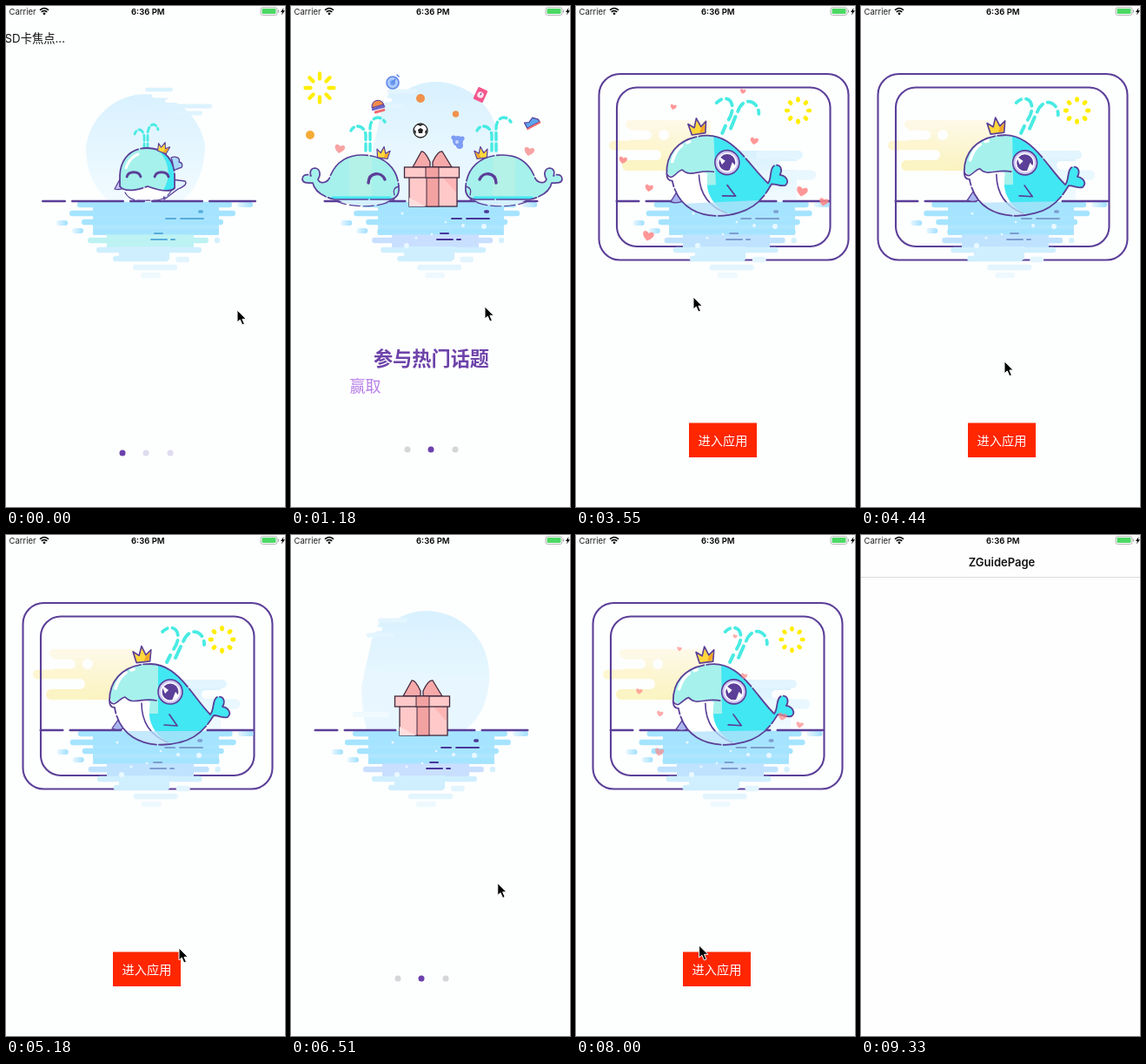
Recreate the animation shown at these times as an HTML page. Size 321x575 px, loop 9670 ms.

```html
<!DOCTYPE html>
<html lang="zh">
<head>
<meta charset="utf-8">
<title>Guide pages</title>
<style>
html,body{margin:0;width:100%;height:100%;overflow:hidden;background:#fdfefe}
svg{display:block;width:100vw;height:100vh}
.ui{font-family:Inter,Roboto,sans-serif}
.cjk{font-family:"Noto Sans CJK SC","Noto Sans CJK",sans-serif}
.ln{fill:none;stroke-linecap:round;stroke-linejoin:round}
</style>
</head>
<body>
<svg id="stage" viewBox="0 0 321 575" preserveAspectRatio="none"></svg>
<script>
const INK = '#5b3f98', AQUA = '#a6f1ec', CYAN = '#41e7f2', TEAL = '#48ebe3';
const STEP = 148.1, LOOP = 9670, LAST = 63, SUBTITLE = '赢取海量精美好礼奖品';

// Shape helpers
const line = (d, c, w, more = '') => `<path class="ln" d="${d}" stroke="${c}" stroke-width="${w}" ${more}/>`;
const fill = (d, c, w = 0, s = INK) => `<path d="${d}" fill="${c}" stroke="${w ? s : 'none'}" stroke-width="${w}" stroke-linejoin="round"/>`;
const pill = (a, b, y, h, c) => line(`M${a + h / 2} ${y}H${b - h / 2}`, c, h);
const dot = (x, y, r, c, more = '') => `<circle cx="${x}" cy="${y}" r="${r}" fill="${c}" ${more}/>`;
const rect = (x, y, w, h, c, more = '') => `<rect x="${x}" y="${y}" width="${w}" height="${h}" fill="${c}" ${more}/>`;
const group = (id, body, more = '') => `<g id="${id}" ${more}>${body}</g>`;
const at = (x, y, body, more = '') => `<g transform="translate(${x} ${y}) ${more}">${body}</g>`;

const heart = (s, c) => `<path transform="rotate(12) scale(${s})" d="M0 5C-10 -1 -5 -8 0 -3C5 -8 10 -1 0 5Z" fill="${c}"/>`;
const crown = (x, y, s, r) => at(x, y, fill('M-6 6L-8 -4L-3 0L0 -8L3 0L8 -4L6 6Z', '#ffd83c', 1.3) +
  fill('M1 5L3 1L7 -2L5 5Z', '#f5a524'), `rotate(${r}) scale(${s})`);
const sun = (a, b, w) => Array.from({length: 8}, (_, i) =>
  line(`M${a} 0H${b}`, '#ffee00', w, `transform="rotate(${i * 45})"`)).join('');
const dots = (on, y, c) => [134, 161, 189].map((x, i) => dot(x, y, 3.5, i === on ? '#6c41ac' : c)).join('');

function water(mark, tint, shift) {
  const b = '#a5e4ff', soft = '#cfeffe', pale = '#e3f5fe';
  const rows = [[82, 260, 228, b], [73, 264, 238, b], [87, 250, 248, b], [100, 245, 259, b], [94, 233, 269, tint],
    [104, 225, 280, soft], [123, 187, 290, soft], [195, 211, 291, pale], [146, 197, 300, pale], [155, 178, 309, '#eef9fe']];
  const marks = [[221, 227, 236], [183, 196, 244], [200, 228, 244], [170, 181, 261], [166, 186, 268], [189, 195, 268]];
  const bits = [[266, 284, 228], [58, 71, 249], [76, 89, 258]];
  const cuts = [[38, 6, 20], [69, 4, 0]];
  return rect(100, 225, 145, 38, 'url(#deep)') + rect(116, 262, 100, 15, tint) + rect(130, 276, 58, 15, soft) +
    `<g class="sway">` + rows.map(r => pill(r[0], r[1], r[2], 6.6, r[3])).join('') +
    bits.map(r => rect(r[0], r[2] - 3, r[1] - r[0], 6, 'url(#bit)', 'rx="3"')).join('') +
    dot(243, 269, 3.2, '#d4f0fd') + `</g><g class="sway2">` +
    marks.map(r => pill(...r, r[2] === 236 ? 3.4 : 2.2, mark)).join('') + `</g>` +
    [[41, 69], [75, 136], [142, 160], [167, 227], [233, 288]].map(s => pill(s[0] + shift, s[1] + shift, 224, 2.6, INK)).join('');
}
const bubbles = [[222, 253, 3], [198, 252, 2], [133, 275, 3], [128, 238, 1.5], [144, 266, 1.5], [162, 262, 1.3], [178, 248, 1.3]]
  .map(b => dot(...b, '#e9f8ff')).join('');

// First page
const whale1 =
  line('M159 164V150C158 141 151 139 148 147M163 164V146C164 134 173 133 175 142', TEAL, 2.8, 'stroke-dasharray="6 3.5"') +
  fill('M192 190C193 180 191 178 190 174C195 172 201 174 199 179C204 180 204 186 199 186C197 188 194 187 192 190Z', '#a9d9fa', 1.3) +
  fill('M132 197L125 210Q130 212 137 208Z', '#c8c8f5', 1.3) +
  fill('M190 199L206 201Q210 205 198 210L182 222L180 208Z', '#dff3ff', 1.3) +
  fill('M134 207C138 226 184 228 192 208Z', '#fff') +
  line('M137 214C142 224 154 224 162 223C176 224 184 222 190 212', INK, 1.2, 'stroke-dasharray="14 4"') +
  fill('M131 207V194C132 174 145 163 162 163C181 163 193 175 194 194V209C188 215 174 211 163 207C151 211 137 215 131 207Z', AQUA) +
  fill('M176 167C188 172 193 182 193 194V209Q189 213 181 211C190 198 188 178 176 167Z', CYAN) +
  line('M138 186Q142 174 152 170', '#fff', 3) +
  line('M131 207V194C132 174 145 163 162 163C181 163 193 175 194 194V209C188 215 174 211 163 207C151 211 137 215 131 207Z', INK, 1.8, 'stroke-dasharray="52 3"') +
  line('M139 196C141 189 153 189 155 196M171 196C173 189 185 189 187 196', INK, 2.8) + crown(181, 163, .85, 18);
const page1 =
  `<path d="M92 224V162A69 69 0 0 1 229 162Q227 205 202 224H119Q92 203 92 162Z" fill="url(#sky)"/>` +
  pill(160, 192, 96, 4.5, '#d9f2fe') + pill(168, 204, 103, 5, '#fdfefe') + pill(175, 237, 115, 5, '#dcf3fe') +
  pill(183, 234, 109, 4, '#fdfefe') + pill(190, 226, 123, 5, '#def4fe') +
  water('#58addb', '#bdf2f3', 0) + group('whale1', whale1) + dots(0, 513, '#dfdcf0');

// Second page
const whaleBody = 'M82 171C60 171 49 184 44 198C40 204 33 204 31 199C35 193 33 187 28 186C23 186 21 190 23 195C18 192 13 194 13 199C14 204 20 203 25 203C27 212 36 219 50 222H112C120 222 125 217 124 208C123 185 106 171 82 171Z';
const whale2 = fill('M50 220C68 233 104 233 121 218Z', '#d5f0fc') + fill(whaleBody, AQUA) +
  fill('M67 175Q80 170 93 173V220H67Z', '#b4f1e6') + line('M48 220H114', CYAN, 3) +
  line('M52 224C70 232 102 232 119 222', INK, 1.2, 'stroke-dasharray="12 4"') +
  line(whaleBody, INK, 1.7, 'stroke-dasharray="46 3"') + line('M124 207Q116 209 119 217', INK, 1.3) +
  line('M89 203C90 190 104 190 108 199', INK, 3.4) + crown(106, 169, .95, 8);
const spray2 = line('M86 166V148C85 138 74 134 69 143M91 166V140C91 128 102 124 108 133', TEAL, 3.4, 'stroke-dasharray="8 4.5"');
const EDGE = '#40283d';
const bow = fill('M160 185H140L150 167Q154 166 160 179Z', '#f6a9a9', 1.3, EDGE) + fill('M163 185H185L174 167Q169 166 163 179Z', '#f6a9a9', 1.3, EDGE);
const gift = rect(136, 196, 55, 34, '#ffc9c9', `stroke="${EDGE}" stroke-width="1.3"`) + rect(156, 196, 14, 34, '#f3a2a2', `stroke="${EDGE}"`) +
  fill('M136 220V230H155Z', '#ffdede') + fill('M175 197H190V214Z', '#ffb5b5') +
  group('lid', bow + rect(130.5, 185, 63, 12, '#ffc9c9', `stroke="${EDGE}" stroke-width="1.3"`) + rect(155, 185, 15, 12, '#f3a2a2', `stroke="${EDGE}"`));
const icons = [
  [117, 87, dot(0, 1, 7, '#a9c9ff', 'stroke="#5f86e8" stroke-width="1.6"') + dot(0, 1, 3, '#6d9cf0') + line('M5 -8L7 -6M0 1L3 -3', '#5f86e8', 1.6)],
  [149, 106, dot(0, 0, 5, '#f0914c')],
  [189.5, 124, dot(0, 0, 3.7, '#f0914c')],
  [22, 148, dot(0, 0, 5, '#f5ab38')],
  [100, 115, at(0, 0, fill('M-7 0C-6 -9 6 -9 7 0Z', '#f28c4b', 1.2) + pill(-8, 8, 2, 3, '#6b62c8') + pill(-6, 7, 6, 3, '#f06a70'), 'rotate(-15)')],
  [149, 143, dot(0, 0, 8, '#fff', 'stroke="#222" stroke-width="1.3"') + fill('M0 -3L3 -1L2 3H-2L-3 -1ZM-4 -7H3L0 -5ZM-8 -2L-5 1L-6 5ZM8 -2L5 1L6 5Z', '#222')],
  [192, 156, dot(-5, -5, 2.6, '#7d9cf4') + dot(5, -4, 2.6, '#7d9cf4') + dot(0, -1, 6, '#7d9cf4') + dot(2, 4, 4, '#7d9cf4') + dot(-1, 0, 2, '#c9d8ff')],
  [218, 102, at(0, 0, rect(-6, -7.5, 12, 15, '#f4568d', 'rx="1.5"') + dot(0, 0, 3.7, '#ffe3ee') + line('M0 0V-2', INK, 1), 'rotate(25)')],
  [277, 133, at(0, 0, fill('M-8 4V-3L-3 -1L3 -4L8 1V4Z', '#5aa5ee', 1.2) + line('M-8 5H8', '#f06a70', 2), 'rotate(-28)')]
];
const hearts2 = [[56, 164, 68, 175], [274, 167, 258, 175]];
const page2 =
  `<path d="M98 224Q92 205 92 174L104 120L114 97H132Q148 87 166 87A73 73 0 0 1 239 160Q238 200 211 224Z" fill="url(#sky)"/>` +
  fill('M96 155L239 164Q238 203 211 224H98Q91 190 96 155Z', '#e8f7ff') +
  pill(111, 145, 98, 5, '#e3f5fe') + pill(98, 130, 115, 5, '#e3f5fe') + pill(88, 116, 108, 5, '#fdfefe') + pill(82, 124, 206, 6, '#f0faff') +
  water('#49379a', '#c9dfff', -3.5) + bubbles +
  group('sun2', sun(10.5, 16.5, 4.3)) +
  hearts2.map((h, i) => group('heart' + i, heart(1, '#f7a3a3'))).join('') +
  `<g clip-path="url(#dry)">` + group('whales', spray2 + at(145, 0, spray2) + whale2 + at(325, 0, whale2, 'scale(-1 1)')) + `</g>` +
  group('icons', icons.map((n, i) => group('icon' + i, n[2])).join('')) + gift +
  `<text id="head" class="cjk" x="161.5" y="413" font-size="22.2" font-weight="700" fill="#6d43aa" text-anchor="middle">参与热门话题</text>` +
  `<text id="sub" class="cjk" x="67.5" y="442.5" font-size="18" font-weight="500" fill="#b87fe8"></text>` + dots(1, 509, '#d6d6d9');

// Third page
const big = 'M119 190C119 164 138 148 166 148C198 148 214 185 235 206C240 200 237 189 243 186C250 184 253 191 249 197C256 198 260 205 255 209C250 211 245 207 239 207C232 218 222 233 200 238C174 245 132 241 125 198Q119 198 119 190Z';
const whale3 =
  line('M185 146L189 138M195 141L201 128', TEAL, 4) +
  line('M193 131C205 113 193 99 180 111M204 122C212 103 229 112 228 126', TEAL, 3.8, 'stroke-dasharray="11 6"') +
  fill('M129 212L122 222Q128 225 136 222Z', '#a9b6ee', 1.3) + fill(big, CYAN) +
  `<g clip-path="url(#body)">` + rect(115, 145, 60, 60, AQUA) +
  fill('M119 186C124 200 130 187 136 186C145 195 155 184 166 192C161 215 172 232 192 240L125 245L115 195Z', '#fff') +
  line('M119 190C125 200 130 187 137 186C146 196 156 186 173 190M156 193C156 215 166 230 186 238', INK, 1.6) +
  rect(115, 225, 130, 22, '#b4e2fb', 'opacity=".78"') + `</g>` +
  line('M126 176Q130 163 138 158M144 155L147 154', '#fff', 3.6) +
  line(big, INK, 1.8, 'stroke-dasharray="60 3"') +
  dot(189, 180, 14, '#cfc7f5', `stroke="${INK}" stroke-width="1.6"`) + dot(189, 180, 11, '#fff') + dot(189, 180, 9.5, INK) +
  fill('M179 172L187 178L183 182ZM191 190L195 180L199 185Z', '#fff') +
  line('M188 206L197 219L182 218', INK, 1.7) + crown(157, 138, 1.3, -6);
const frame = (x, y, w, h, r) => rect(x, y, w, h, 'none', `rx="${r}" stroke="${INK}" stroke-width="2.1"`);
const hearts3 = [[105, 116, .6], [185, 98, .55], [47, 177, .8], [77, 209, .8], [198, 155, .8], [253, 213, 1.1], [278, 225, .9], [76, 264, 1.1]];
const cream = '#fdf6d0';
const page3 =
  rect(55, 131, 93, 58, 'url(#cream)') + pill(50, 100, 136, 10, '#fdf9e6') + pill(31, 90, 160, 11, cream) + pill(46, 100, 183, 12, '#fbf4c4') +
  pill(48, 80, 148, 11, '#fdfefe') + dot(94, 148, 6, '#fdfefe') + pill(40, 91, 171, 12, '#fdfefe') +
  rect(162, 166, 85, 59, 'url(#sky)') + pill(200, 254, 171, 10, '#e3f5fe') + pill(200, 269, 194, 11, '#e9f7fe') + pill(225, 262, 183, 10, '#fdfefe') +
  frame(19.5, 78, 287, 213.5, 24) + frame(40, 93.5, 245.5, 182.5, 23) +
  water('#7d9dd0', '#bfe2ff', -2.5) + bubbles + group('sun3', sun(12, 13.5, 4.8)) + group('whale3', whale3) +
  hearts3.map((h, i) => group('love' + i, heart(h[2], '#ff8585'))).join('') +
  rect(123, 478.5, 78, 39.5, '#ff2600') +
  `<text class="cjk" x="162" y="503.5" font-size="14.2" fill="#fff" text-anchor="middle">进入应用</text>`;

const grad = (id, a, b, dir) => `<linearGradient id="${id}" x2="${dir ? 1 : 0}" y2="${dir ? 0 : 1}"><stop stop-color="${a}"/><stop offset="1" stop-color="${b}"/></linearGradient>`;
const status =
  `<g class="ui" font-size="9.5" fill="#222"><text x="3.5" y="9.7">Carrier</text><text x="163.3" y="9.8" font-weight="600" text-anchor="middle" fill="#000">6:36 PM</text></g>` +
  line('M39.5 4.3Q44 .7 48.5 4.3M41.3 6.5Q44 4.5 46.7 6.5', '#000', 1.6) + dot(44, 8.8, 1.4, '#000') +
  rect(293, 1.7, 19, 8.8, 'none', 'rx="2.3" stroke="#a5a5a5" stroke-width=".8"') + rect(294.5, 3.1, 16, 6, '#4cd964', 'rx="1"') +
  rect(313, 4.5, 1, 3, '#a5a5a5') + fill('M319.5 2L316 7H318L317 10.5L321 5.3H318.8Z', '#000');

stage.innerHTML = `<defs>${grad('sky', '#d8f1fe', '#f2fbff')}${grad('deep', '#a2e3ff', '#b3e6ff')}${grad('cream', '#fdf9e8', '#fbf3bf')}${grad('bit', '#e8f7ff', '#9fdfff', 1)}
  <clipPath id="dry"><rect width="325" height="232"/></clipPath><clipPath id="body"><path d="${big}"/></clipPath></defs>` +
  rect(0, 0, 321, 575, '#fdfefe') + group('p0', page1) + group('p1', page2) + group('p2', page3) +
  `<text id="note" x="-1.5" y="42.3" font-size="13.3" fill="#111" font-family="Inter,'Noto Sans CJK SC',sans-serif">SD卡焦点...</text>` +
  group('nav', rect(0, 0, 321, 575, '#fefefe') + rect(0, 48, 321, 1, '#dcdcdc') +
    `<text class="ui" x="162" y="36" font-size="13" font-weight="600" fill="#111" text-anchor="middle">ZGuidePage</text>`) + status +
  group('mouse', fill('M0 0V14L3.3 11.2L5.8 17L8.4 15.9L5.9 10.3H10.3Z', '#000', 1, '#fff'));

// Keyframes: [step, value, ...]
const K = {
  scroll: [[1, 0], [2, 110], [3, 240], [4, 305], [5, 322], [6, 325], [19, 325], [20, 375], [21, 480], [22, 590], [23, 632], [24, 643], [25, 650],
    [40, 650], [41, 590], [42, 480], [43, 380], [44, 336], [45, 325], [47, 325], [48, 400], [49, 510], [50, 610], [51, 641], [52, 650]],
  mouse: [[1, 266, 349], [3, 90, 352], [5, 120, 350], [8, 223, 345], [18, 238, 341], [19, 238, 341], [21, 90, 337], [23, 110, 334], [24, 135, 334],
    [31, 170, 420], [35, 199, 474], [37, 180, 480], [40, 60, 400], [43, 235, 400], [47, 246, 398], [49, 61, 395], [50, 48, 395], [55, 165, 490], [58, 165, 490], [61, 250, 580]],
  whales: [[4, 0], [6, 1], [20, 1], [22, 0]],
  lid: [[5, 0], [6, 1], [7, 1], [8, 0], [16, 0], [17, 1], [19, 1], [21, 0]],
  icons: [[6, 0], [8, 1], [16, 1], [18, 0]],
  hearts: [[5, 0], [7, 1], [16, 1], [20, 0]],
  big: [[22, 0], [24, 1], [40, 1], [41, 0], [50, 0], [52, 1]],
  drift: [[24, -21], [27, 0], [41, 0], [42, -21], [52, -21], [55, 0]],
  love: [[22, 0], [24, 1], [30, 0], [51, 0], [53, 1], [58, 0]],
  nav: [[57, 0], [59, 1]]
};
function key(table, t) {
  let i = table.findIndex(k => k[0] > t);
  if (i < 0) return table[table.length - 1].slice(1);
  if (!i) return table[0].slice(1);
  const a = table[i - 1], b = table[i], p = (t - a[0]) / (b[0] - a[0]);
  return a.slice(1).map((v, j) => v + (b[j + 1] - v) * p);
}
const $ = id => document.getElementById(id);
const move = (id, x, y, more = '') => $(id).setAttribute('transform', `translate(${x} ${y}) ${more}`);
const show = (id, o) => $(id).setAttribute('opacity', o);
const mix = (a, b, p) => a + (b - a) * p;

function draw(n) {
  const v = {};
  for (const name in K) v[name] = key(K[name], n);
  for (let i = 0; i < 3; i++) move('p' + i, i * 325 - v.scroll[0], 0);
  move('mouse', ...v.mouse);
  show('note', n < 1 ? 1 : 0);
  show('nav', v.nav[0]);

  const wave = Math.sin(n * .57);
  document.querySelectorAll('.sway').forEach(e => e.setAttribute('transform', `translate(${wave * .8} 0)`));
  document.querySelectorAll('.sway2').forEach(e => e.setAttribute('transform', `translate(${-wave} 0)`));

  const up = v.whales[0], open = v.lid[0], out = v.icons[0], love = v.hearts[0];
  move('whales', 0, 60 * (1 - up));
  show('whales', up);
  move('sun2', 33, 94, `scale(${up})`);
  move('lid', -6.5 * open, -14 * open, `rotate(${-38 * open} 161.5 191)`);
  icons.forEach((c, i) => move('icon' + i, mix(162, c[0], out), mix(190, c[1], out), `scale(${out})`));
  show('icons', out);
  hearts2.forEach((h, i) => {
    move('heart' + i, mix(h[2], h[0], love), mix(h[3], h[1], love));
    show('heart' + i, Math.min(1, love * 2));
  });
  show('head', n >= 7 && n < 18 ? 1 : 0);
  $('sub').textContent = n < 18 ? SUBTITLE.slice(0, Math.max(0, (n - 7) * 2)) : '';

  const rise = v.big[0], hug = v.love[0];
  const rock = v.drift[0] === 0 ? Math.sin((n - 35) * .5) * 1.5 : v.drift[0] / 8;
  move('whale3', v.drift[0], 30 * (1 - rise), `rotate(${rock} 180 205)`);
  show('whale3', rise);
  move('sun3', 248.5, 120, `scale(${rise * (1 + .05 * Math.sin((n - 35) * .6))})`);
  hearts3.forEach((h, i) => {
    move('love' + i, mix(175, h[0], hug), mix(190, h[1], hug), `scale(${hug})`);
    show('love' + i, hug * .85);
  });
}

function tick() {
  const t = performance.now() % LOOP;
  draw(Math.min(LAST, Math.floor((t + 10) / STEP)));
  requestAnimationFrame(tick);
}
tick();
</script>
</body>
</html>
```
